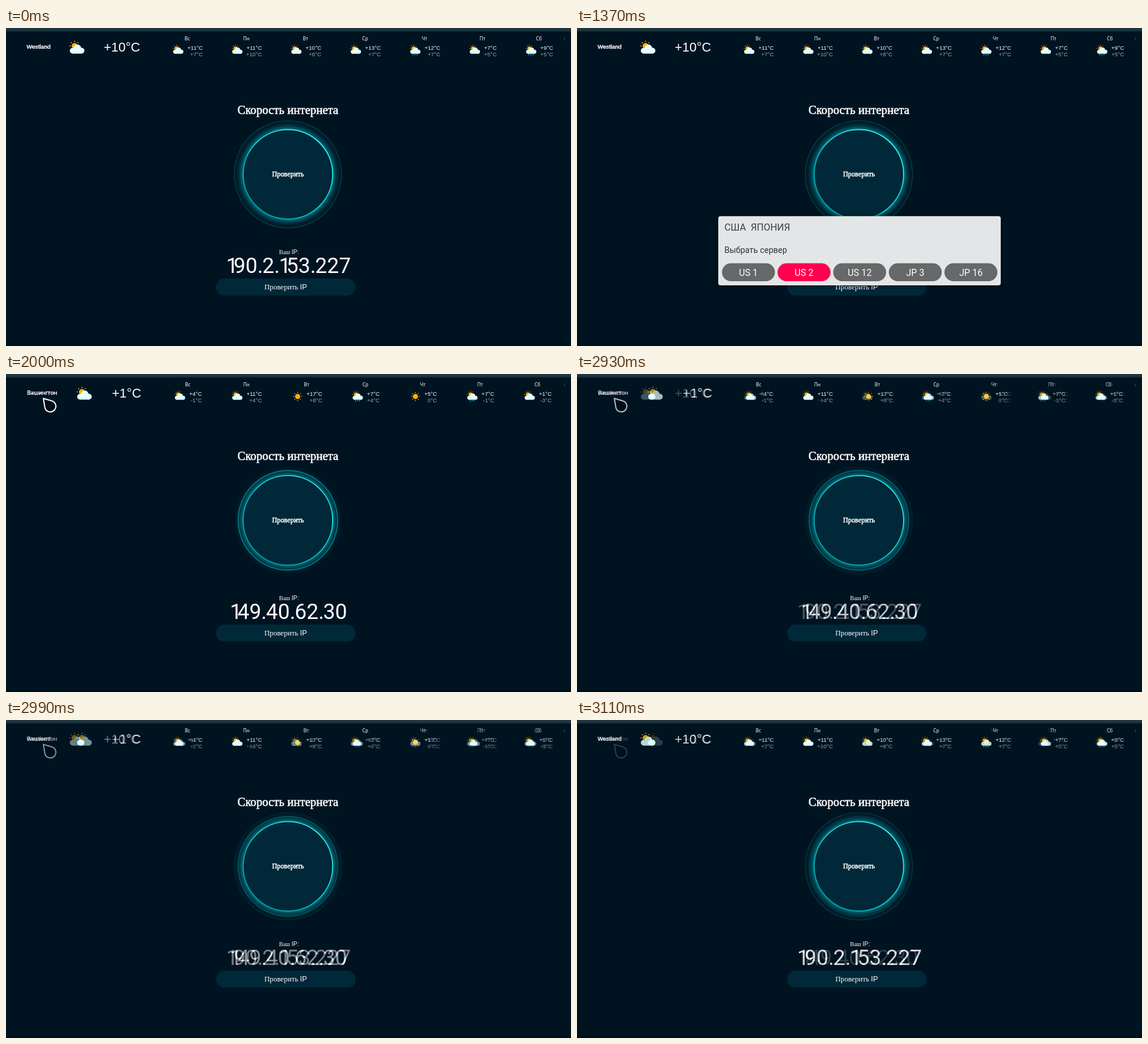
Write an HTML page with a canvas that moves like this. It is 960 by 540 pixels and loops after 3140 ms.

```html
<!DOCTYPE html>
<html lang="ru">
<head>
<meta charset="utf-8">
<title>Скорость интернета</title>
<style>
  html, body { margin: 0; width: 100%; height: 100%; overflow: hidden; background: #001321; }
  canvas { display: block; width: 100%; height: 100%; }
</style>
</head>
<body>
<canvas id="stage" width="960" height="540"></canvas>
<script>
const W = 960, H = 540, TAU = Math.PI * 2, LOOP = 3140;
const SERIF = '"Liberation Serif", serif';
const ARIAL = '"Liberation Sans", sans-serif';
const NOTO = '"Noto Sans", sans-serif';
const ROBOTO = 'Roboto, sans-serif';
const DAYS = ['Вс', 'Пн', 'Вт', 'Ср', 'Чт', 'Пт', 'Сб'];
const PANEL = '#002838', CLOUD = '#e0ffff', SUN = '#ffb300';
let ctx;

function text(str, x, y, size, family, { color = '#fff', align = 'left', embolden = 0 } = {}) {
  ctx.font = `${size}px ${family}`;
  ctx.textAlign = align;
  ctx.fillStyle = ctx.strokeStyle = color;
  ctx.fillText(str, x, y);
  if (embolden) {
    ctx.lineWidth = embolden;
    ctx.strokeText(str, x, y);
  }
  return ctx.measureText(str).width;
}

function box(x, y, w, h, r, color) {
  ctx.fillStyle = color;
  ctx.beginPath();
  ctx.roundRect(x, y, w, h, r);
  ctx.fill();
}

function disc(x, y, r, color) {
  ctx.fillStyle = color;
  ctx.beginPath();
  ctx.arc(x, y, r, 0, TAU);
  ctx.fill();
}

function ring(x, y, r, width, color) {
  ctx.strokeStyle = color;
  ctx.lineWidth = width;
  ctx.beginPath();
  ctx.arc(x, y, r, 0, TAU);
  ctx.stroke();
}

function line(x1, y1, x2, y2, width, color) {
  ctx.strokeStyle = color;
  ctx.lineWidth = width;
  ctx.beginPath();
  ctx.moveTo(x1, y1);
  ctx.lineTo(x2, y2);
  ctx.stroke();
}

function sun(x, y, r) {
  disc(x, y, r, SUN);
  for (let i = 0; i < 8; i++) {
    const c = Math.cos(i * TAU / 8), s = Math.sin(i * TAU / 8);
    line(x + c * r * 1.4, y + s * r * 1.4, x + c * r * 1.75, y + s * r * 1.75, r / 3, SUN);
  }
}

// kind: c = cloud, r = cloud with rain, s = clear sun
function weatherIcon(kind, x, y, scale) {
  ctx.save();
  ctx.translate(x, y);
  ctx.scale(scale, scale);
  if (kind === 's') {
    sun(14.5, 14.5, 6.2);
  } else {
    sun(9.5, 9.5, 5);
    disc(6.3, 17.6, 4.9, CLOUD);
    disc(14.3, 13.6, 6.5, CLOUD);
    disc(21.2, 17.5, 5, CLOUD);
    box(6, 14, 15.5, 8.5, 0, CLOUD);
    if (kind === 'r') {
      for (const dx of [8, 13, 18]) line(dx + 2, 21.5, dx - 1, 26.5, 1.7, '#16b4d8');
    }
  }
  ctx.restore();
}

function forecast(weather) {
  let x = weather.start;
  DAYS.forEach((day, i) => {
    const [kind, high, low] = weather.days[i].split(' ');
    ctx.font = `9.5px ${ARIAL}`;
    const width = 25.3 + ctx.measureText(high + '°C').width;
    weatherIcon(kind, x, 28, 0.7);
    text(day, x + width / 2 - 0.7, 21, 8, NOTO, { align: 'center' });
    text(high + '°C', x + width, 37, 9.5, ARIAL, { align: 'right' });
    text(low + '°C', x + width, 48, 9.5, ARIAL, { align: 'right', color: '#97a7ac' });
    x += width + weather.gap;
  });
}

function ipNumber(ip) {
  const tighten = { '1': 7.5, '.': 1.3 };
  ctx.font = `36px ${ROBOTO}`;
  const advance = c => ctx.measureText(c).width - (tighten[c] || 0);
  const chars = [...ip];
  let x = 480 - chars.reduce((sum, c) => sum + advance(c), 0) / 2;
  for (const c of chars) {
    text(c, x, 416, 36, ROBOTO);
    x += advance(c);
  }
}

function button({ radius, edge, outer }) {
  const x = 479, y = 248.5;
  if (outer) ring(x, y, outer.r, outer.width, outer.color);
  ctx.save();
  ctx.shadowColor = '#00dbe4';
  ctx.shadowBlur = outer ? 15 : 6;
  disc(x, y, radius, PANEL);
  ctx.restore();
  const shade = ctx.createLinearGradient(x + 54, y - 54, x - 54, y + 54);
  shade.addColorStop(0, '#2bf6f8');
  shade.addColorStop(1, outer ? '#00a4ae' : '#00cdd2');
  ring(x, y, radius, edge, shade);
  text('Проверить', x, 252, 11.9, SERIF, { align: 'center', embolden: 0.5 });
}

function page(weather, look) {
  box(0, 0, W, H, 0, '#001321');
  box(0, 0, W, 5, 0, '#27343c');
  box(0, 4, W, 2, 0, '#0b333d');
  box(0, 538, W, 2, 0, '#000c16');

  text(weather.city, weather.cityX, 35, weather.citySize, weather.cityFont, { embolden: 0.5 });
  weatherIcon('c', weather.iconX, 21, 1);
  text(weather.now, weather.nowX, 40, 22, ARIAL);
  forecast(weather);
  text('i', 949, 21, 9, `italic, ${SERIF}`.replace('italic, ', ''), { align: 'center', color: '#52636c' });

  text('Скорость интернета', 479, 146, 20.1, SERIF, { align: 'center', embolden: 0.6 });
  button(look);
  const label = text('Ваш ', 464, 384, 10, SERIF);
  text('IP:', 464 + label, 384, 10, ARIAL);
  ipNumber(weather.ip);
  box(357, 425.5, 237, 29, 14.5, PANEL);
  const check = text('Проверить ', 439, 444, 12.6, SERIF);
  text('IP', 439 + check, 444, 12.6, ARIAL);
}

function globe(x, y, r, color) {
  ring(x, y, r, 1, color);
  ctx.beginPath();
  ctx.ellipse(x, y, r * 0.48, r, 0, 0, TAU);
  ctx.stroke();
  line(x, y - r, x, y + r, 1, color);
  line(x - r, y, x + r, y, 1, color);
  for (const s of [-1, 1]) line(x - r * 0.85, y + s * r / 2, x + r * 0.85, y + s * r / 2, 1, color);
}

function dialog(top, bottom, title, buttons) {
  ctx.save();
  ctx.shadowColor = 'rgba(0,0,0,.7)';
  ctx.shadowBlur = 6;
  box(240, top, 480, bottom - top, 4, 'rgba(240,242,242,.95)');
  ctx.restore();
  text(title, 250.5, top + 24.5, 16.3, ROBOTO, { color: '#3d4142' });
  buttons.forEach((label, i) => {
    const x = 246.3 + i * 94.5, y = bottom - 37.5;
    box(x, y, 90, 30.5, 15.2, i === 1 ? '#ff0050' : '#666869');
    if (label) text(label, x + 45, y + 21, 15.6, ROBOTO, { align: 'center' });
    else globe(x + 45, y + 15.3, 8, '#fff');
  });
}

function dialogText(str, x, y) {
  text(str, x, y, 14, ROBOTO, { color: '#303435' });
}

function pointer() {
  ctx.beginPath();
  ctx.moveTo(63.5, 41.5);
  ctx.arc(75.3, 54.8, 9.5, -1.26, 2.94);
  ctx.closePath();
  ctx.lineJoin = 'round';
  ctx.lineWidth = 2;
  ctx.fillStyle = '#000c16';
  ctx.strokeStyle = '#fff';
  ctx.fill();
  ctx.stroke();
}

const westland = {
  city: 'Westland', cityX: 35, citySize: 9.8, cityFont: ARIAL,
  iconX: 107, now: '+10°C', nowX: 166, ip: '190.2.153.227', start: 283, gap: 49,
  days: ['c +11 +7', 'c +11 +10', 'c +10 +8', 'c +13 +7', 'r +12 +7', 'c +7 +5', 'r +9 +5'],
};
const washington = {
  city: 'Вашингтон', cityX: 36, citySize: 9.2, cityFont: NOTO,
  iconX: 119.5, now: '+1°C', nowX: 180, ip: '149.40.62.30', start: 286, gap: 50.6,
  days: ['c +4 -1', 'c +11 +4', 's +17 +8', 'r +7 +4', 's +5 0', 'r +7 -1', 'c +1 -3'],
};
const wideRing = { radius: 76, edge: 1.8, outer: { r: 91, width: 1.7, color: '#05383f' } };
const closeRing = { radius: 76, edge: 1.6, outer: { r: 84.5, width: 1.5, color: '#08777d' } };
const pressed = { radius: 76.7, edge: 2.6 };

function scene(draw) {
  const layer = document.createElement('canvas');
  layer.width = W;
  layer.height = H;
  ctx = layer.getContext('2d');
  draw();
  return layer;
}

const home = scene(() => page(westland, wideRing));
const locations = scene(() => {
  page(westland, pressed);
  dialog(259.5, 497, 'MORVELVPN UDP', ['NL', 'US | JP', 'TCP', 'USB', '']);
  dialogText('Выбор локации:', 250.5, 322);
  dialogText('NL - Нидерланды', 250.5, 342);
  dialogText('US|JP - США, Япония', 250.5, 362);
  dialogText('TCP - Перейти к TCP серверам', 250.5, 402);
  dialogText('USB - VPN подключение с конфигом на usb', 250.5, 422);
  globe(260, 438.8, 7.2, '#303435');
  dialogText('- Проверка IP + Инструкции', 273, 444);
});
const servers = scene(() => {
  page(westland, wideRing);
  dialog(319.5, 437, 'США  ЯПОНИЯ', ['US 1', 'US 2', 'US 12', 'JP 3', 'JP 16']);
  dialogText('Выбрать сервер', 250.5, 382);
});
const connected = scene(() => {
  page(washington, closeRing);
  pointer();
});

const stage = document.getElementById('stage').getContext('2d');

function render() {
  const t = performance.now() % LOOP;
  const current = t < 670 ? home : t < 1370 ? locations : t < 2000 ? servers : connected;
  stage.globalAlpha = 1;
  stage.drawImage(current, 0, 0);
  if (t >= 2870) {
    // Stepped cross-fade back to the start
    stage.globalAlpha = Math.floor((t - 2840) / 30) / 11;
    stage.drawImage(home, 0, 0);
  }
  requestAnimationFrame(render);
}
render();
</script>
</body>
</html>
```
